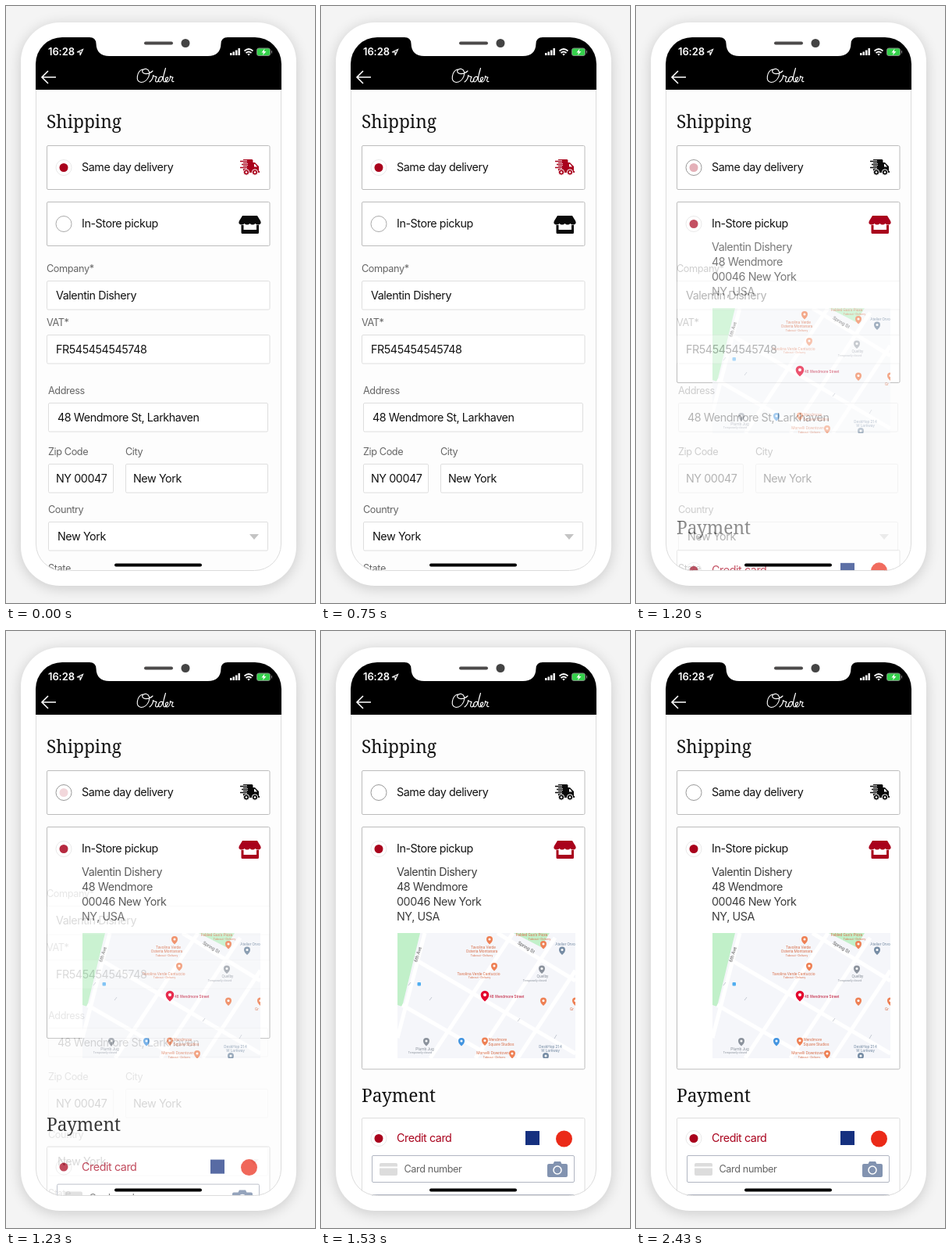
Write an HTML page that moves like this. It is 396x763 px and loops after 2490 ms.

```html
<!DOCTYPE html>
<html lang="en">
<head>
<meta charset="utf-8">
<title>Order: shipping options</title>
<style>
html, body { margin: 0; width: 100%; height: 100%; overflow: hidden; background: #f4f4f4; }
svg { display: block; }
text { font: 14.3px Inter, "Liberation Sans", sans-serif; letter-spacing: -.42px; fill: #111; }
.label { font-size: 12.7px; letter-spacing: -.4px; fill: #666; }
.title { font: 22.7px "Noto Serif", serif; letter-spacing: 0; }
.clock { font-size: 13px; font-weight: 600; letter-spacing: -.1px; fill: #fff; }
.address text { fill: #3c3c3c; }
.map text { font: 4.9px Roboto, "Liberation Sans", sans-serif; letter-spacing: 0; text-anchor: middle; }
.map .note { font-size: 3.6px; }
.map .start { text-anchor: start; }
.frame { fill: #fff; stroke: #bcbcbc; }
.field { fill: #fff; stroke: #dedede; }
.line { fill: none; stroke: #fff; }
</style>
</head>
<body>
<svg width="396" height="763" viewBox="0 0 396 763">
  <defs>
    <filter id="soft" x="-20%" y="-20%" width="140%" height="140%"><feGaussianBlur stdDeviation="9"/></filter>
    <clipPath id="screen"><rect x="38" y="40" width="315" height="682" rx="34"/></clipPath>
    <clipPath id="mapArea"><rect x="98" y="386" width="228" height="160"/></clipPath>
    <g id="truck" fill="currentColor">
      <path d="M304 196h11a1.5 1.5 0 0 1 1.5 1.5V200h2.500l5 5v6h1v2h-21z"/>
      <path d="M300 198.500h9M301 202.500h9M300 206.500h9" stroke="#fff" stroke-width="3.200"/>
      <path d="M300 198.500h9M302 202.500h9M300 206.500h9" stroke="currentColor" stroke-width="1.500"/>
      <path d="M318 202h1l3 3.500h-4z" fill="#fff"/>
      <g stroke="#fff" stroke-width="1"><circle cx="308" cy="212.500" r="3.700"/><circle cx="319" cy="212.500" r="3.700"/></g>
      <g fill="#fff"><circle cx="308" cy="212.500" r="1.300"/><circle cx="319" cy="212.500" r="1.300"/></g>
    </g>
    <g id="store" fill="currentColor">
      <path d="M303 268h19l4 6.500q2 4-2 5-3 .5-4.500-1.500-1.500 1.500-3.500 1.500t-3.500-1.500q-1.500 1.500-3.500 1.500t-3.500-1.500q-1.500 2-4.500 1.500-4-1-2-5z"/>
      <path fill-rule="evenodd" d="M301.500 280h22.500v9.500q0 1.500-1.500 1.500h-19.500q-1.500 0-1.500-1.500zM304.500 280v6h16.500v-6z"/>
    </g>
  </defs>

  <rect x="19" y="24" width="353" height="720" rx="50" fill="#000" opacity=".17" filter="url(#soft)"/>
  <rect x="19" y="21" width="353" height="720" rx="50" fill="#fff"/>

  <g clip-path="url(#screen)">
    <rect x="38" y="40" width="315" height="682" fill="#fdfdfd"/>
    <text class="title" x="52" y="156">Shipping</text>

    <rect class="frame" x="52.500" y="178.500" width="285.500" height="56" rx="1.500"/>
    <circle id="ringA" cx="74" cy="206.500" r="10" fill="#fff"/>
    <circle id="dotA" cx="74" cy="206.500" r="5.500" fill="#a9021c"/>
    <text x="97" y="210.500">Same day delivery</text>
    <use id="truckUse" href="#truck"/>

    <rect id="pickup" class="frame" x="52.500" y="250.500" width="285.500" height="56" rx="1.500"/>
    <circle id="ringB" cx="74" cy="278.500" r="10" fill="#fff"/>
    <circle id="dotB" cx="74" cy="278.500" r="5.500" fill="#a9021c"/>
    <text x="97" y="283">In-Store pickup</text>
    <use id="storeUse" href="#store"/>

    <g id="details">
      <g class="address">
        <text x="97" y="313">Valentin Dishery</text>
        <text x="97" y="332">48 Wendmore</text>
        <text x="97" y="351">00046 New York</text>
        <text x="97" y="370">NY, USA</text>
      </g>
      <g class="map" id="map" clip-path="url(#mapArea)"></g>
    </g>

    <g id="payment">
      <text class="title" x="52" y="602">Payment</text>
      <rect class="field" x="52.500" y="622.500" width="285.500" height="200" rx="1.500"/>
      <circle cx="74" cy="648.500" r="10" fill="#fff" stroke="#e9e9e9"/>
      <circle cx="74" cy="648.500" r="5.500" fill="#a9021c"/>
      <text x="97" y="653" style="fill:#a9021c">Credit card</text>
      <rect x="262" y="639" width="18" height="18" fill="#15307f"/>
      <circle cx="311.500" cy="649" r="10.500" fill="#eb2a18"/>
      <g fill="#fff" stroke="#b1b6c2">
        <rect x="65.500" y="670.500" width="259" height="34" rx="1.500"/>
        <rect x="65.500" y="720.500" width="259" height="34" rx="1.500"/>
      </g>
      <rect x="75" y="680" width="23" height="16" rx="2" fill="#dcdcdc"/>
      <path d="M75 685.500h23" stroke="#fff" stroke-width="2"/>
      <text class="label" x="106.500" y="692">Card number</text>
      <path d="M292 681h5.500l1.500-3h8l1.500 3h5.500a2 2 0 0 1 2 2v13a2 2 0 0 1-2 2h-22a2 2 0 0 1-2-2v-13a2 2 0 0 1 2-2z" fill="#8293b0"/>
      <circle cx="303" cy="689" r="5" fill="none" stroke="#fff" stroke-width="1.500"/>
    </g>

    <g id="form"></g>

    <rect x="38" y="40" width="315" height="67" fill="#000"/>
  </g>
  <path d="M38.500 107V688a34 34 0 0 0 34 33.500H318.500a34 34 0 0 0 34-33.500V107" fill="none" stroke="#dcdcdc"/>
  <path d="M107 39v1q8 0 8.500 8 .5 16 17 16h126q16.500 0 17-16 .5-8 8.500-8v-1z" fill="#fff"/>
  <path d="M179 47.500h33" stroke="#4c4a4a" stroke-width="4" stroke-linecap="round"/>
  <circle cx="230" cy="47.500" r="5.500" fill="#444"/>

  <text class="clock" x="54" y="63">16:28</text>
  <path class="line" d="M91 59l7.500-3.500-3.500 7.500v-4z" stroke-width="1.200"/>
  <g fill="#fff">
    <rect x="287" y="60" width="2.500" height="3"/><rect x="290.500" y="58.500" width="2.500" height="4.500"/>
    <rect x="294" y="56.500" width="2.500" height="6.500"/><rect x="297.500" y="54" width="2.500" height="9"/>
  </g>
  <path class="line" d="M305.500 57.500q5.500-5 11 0M307.500 60q3.500-3 7 0" stroke-width="1.700"/>
  <path d="M309.300 61.500q1.700-1.500 3.400 0l-1.700 2z" fill="#fff"/>
  <rect x="321.500" y="54" width="17" height="9.500" rx="2.500" fill="#35d14b" stroke="#7d8a7f"/>
  <path d="M340.500 57v3.500" stroke="#888"/>
  <path d="M331.500 54.500l-4 5h2.500l-1 3.500 4.500-5h-2.700z" fill="#fff"/>

  <path class="line" d="M64 91H46.500M54 83l-8 8 8 8" stroke-width="1.600"/>
  <path class="line" role="img" aria-label="Order" stroke-width="1.150" stroke-linecap="round" stroke-linejoin="round"
    d="M175 81C168 83 165 97 173 97.500C182 98 188 83 180 80.500C175 79.500 172 85 178 86.500Q184 87 188 83
       M184 97C187 95 189 91 188.500 88.500C190 91 192 90 193 90.500C191 95 191 97 193 97Q195 97 196 94
       M201 91C197 88 193 96 197 97C201 97 203 85 204.500 79.500C202 87 200 96 203 97C206 96.500 209 92 207 91
       C204 91 203 97 207 97C209 96.500 210.500 93 210.500 89.500C211 91.500 213 91 214 91C212 95 212 97 215 96.500"/>
  <path d="M141 714.500h108" stroke="#000" stroke-width="4" stroke-linecap="round"/>
</svg>

<script>
const LOOP = 2490, START = 1119, SPAN = 185;
const $ = id => document.getElementById(id);
const RED = '#a9021c', INK = '#0a0a0a';

// Form: label, label baseline, value, x, y, width
const field = (label, base, value, x, y, w) =>
  `<text class="label" x="${x}" y="${base}">${label}</text>` +
  `<rect class="field" x="${x + .5}" y="${y + .5}" width="${w}" height="36.500" rx="1.500"/>` +
  `<text x="${x + (w < 200 ? 10 : 12)}" y="${y + 24}">${value}</text>`;

$('form').innerHTML =
  field('Company*', 339.5, 'Valentin Dishery', 52, 351, 285.5) +
  field('VAT*', 408.5, 'FR545454545748', 52, 420, 285.5) +
  field('Address', 495.5, '48 Wendmore St, Larkhaven', 54, 507, 281) +
  field('Zip Code', 573.5, 'NY 00047', 54, 585, 83) +
  field('City', 573.5, 'New York', 153, 585, 182) +
  field('Country', 647.5, 'New York', 54, 659, 281) +
  '<path d="M312 675h12l-6 7z" fill="#c4c4c4"/>' +
  '<text class="label" x="54" y="723">State</text>';

// Map
const ORANGE = '#ee8054', GREY = '#8b929c', BLUE = '#4294e0', SLATE = '#768ca4', CORAL = '#d9714d';
const pin = (x, y, color, r = 4) =>
  `<path d="M${x - r} ${y}a${r} ${r} 0 0 1 ${2 * r} 0q0 ${r * .8}-${r} ${r * 1.6}q-${r}-${r * .8}-${r}-${r * 1.6}" fill="${color}"/>` +
  `<circle cx="${x}" cy="${y}" r="${r * .38}" fill="#fff"/>`;
const tag = (x, y, s, color, cls = '') => `<text class="${cls}" x="${x}" y="${y}" style="fill:${color}">${s}</text>`;
const takeout = (x, y) => tag(x, y, 'Takeout • Delivery', CORAL, 'note');
const closed = (x, y) => tag(x, y, 'Temporarily closed', GREY, 'note');

$('map').innerHTML =
  `<rect x="98" y="386" width="228" height="160" fill="#f5f6fa"/>
  <path d="M98 386h29l-23 94-6-2zM247 386h46l-11 18z" fill="#c1f0c9"/>
  <path d="M133 386L98 520M246 386L140 546M300 392L198 546M326 434L252 546M226 386L326 447M121 420L326 540M104 478L222 546" fill="none" stroke="#fff" stroke-width="5"/>
  <path d="M112 453l3-4M139 472l3-4M299 521l3-5M252 499l3-4" stroke="#b8bec8" stroke-width=".8"/>
  <rect x="123.500" y="449" width="4.500" height="4.500" rx="1" fill="#51aef0"/>
  <text x="0" y="0" transform="translate(126 414) rotate(-73)" style="fill:#555;font-size:6px">6th Ave</text>
  <text x="0" y="0" transform="translate(262 406) rotate(31)" style="fill:#555;font-size:6px">Spring St</text>` +
  pin(216, 394, ORANGE) + tag(208, 405.5, 'Tavolina Verde', CORAL) + tag(206, 410.5, 'Osteria Montanara', CORAL) + takeout(206, 415.5) +
  pin(222, 428, ORANGE) + tag(202, 439.5, 'Tavolina Verde Cantuccio', CORAL) + takeout(203, 444) +
  tag(270, 390, "Fabled Gus's Pizza", CORAL) + takeout(280, 395) + pin(285, 400, ORANGE) +
  tag(313, 402, 'Atelier Orvo', SLATE) + pin(309, 407.5, SLATE) +
  pin(283, 431.5, GREY) + tag(284, 442.5, 'Quelby', GREY) + closed(274, 447.5) +
  pin(285, 472.5, ORANGE) + pin(326, 472.5, ORANGE) + tag(319, 485, 'Gr', CORAL, 'start') +
  pin(135, 524, GREY) + tag(133, 535.5, 'Plumb Jug', GREY) + closed(127, 540) +
  pin(180, 524, BLUE) + pin(210, 523.5, ORANGE) +
  tag(214.5, 524, 'Wendmore', CORAL, 'start') + tag(214.5, 529.5, 'Square Studios', CORAL, 'start') +
  tag(220, 541, 'Morvelli Downtown', CORAL) + takeout(222, 545.5) + pin(245, 540, ORANGE) +
  tag(294, 532.5, 'DeskHop 214', SLATE) + tag(294, 537.5, 'W Larkway', SLATE) + pin(288, 543, SLATE) +
  pin(210, 465, '#e3052e', 5.3) +
  tag(216, 468.5, '48 Wendmore Street', '#c11d3c', 'start');

function draw(now) {
  const t = now % LOOP;
  const u = Math.min(1, Math.max(0, (t - START) / SPAN));
  const p = 1 - (1 - u) ** 2;
  const on = p > 0;

  $('pickup').setAttribute('height', 56 + 253.5 * p);
  $('form').setAttribute('opacity', 1 - p);
  $('details').setAttribute('opacity', p);
  $('payment').setAttribute('opacity', p);
  $('payment').setAttribute('transform', `translate(0 ${235 * (1 - p)})`);
  $('dotA').setAttribute('opacity', 1 - p);
  $('dotB').setAttribute('opacity', p);
  $('ringA').setAttribute('stroke', on ? '#999' : '#e9e9e9');
  $('ringB').setAttribute('stroke', on ? '#e9e9e9' : '#aaa');
  $('truckUse').style.color = on ? INK : RED;
  $('storeUse').style.color = on ? RED : INK;
  requestAnimationFrame(draw);
}
draw(0);
</script>
</body>
</html>
```
